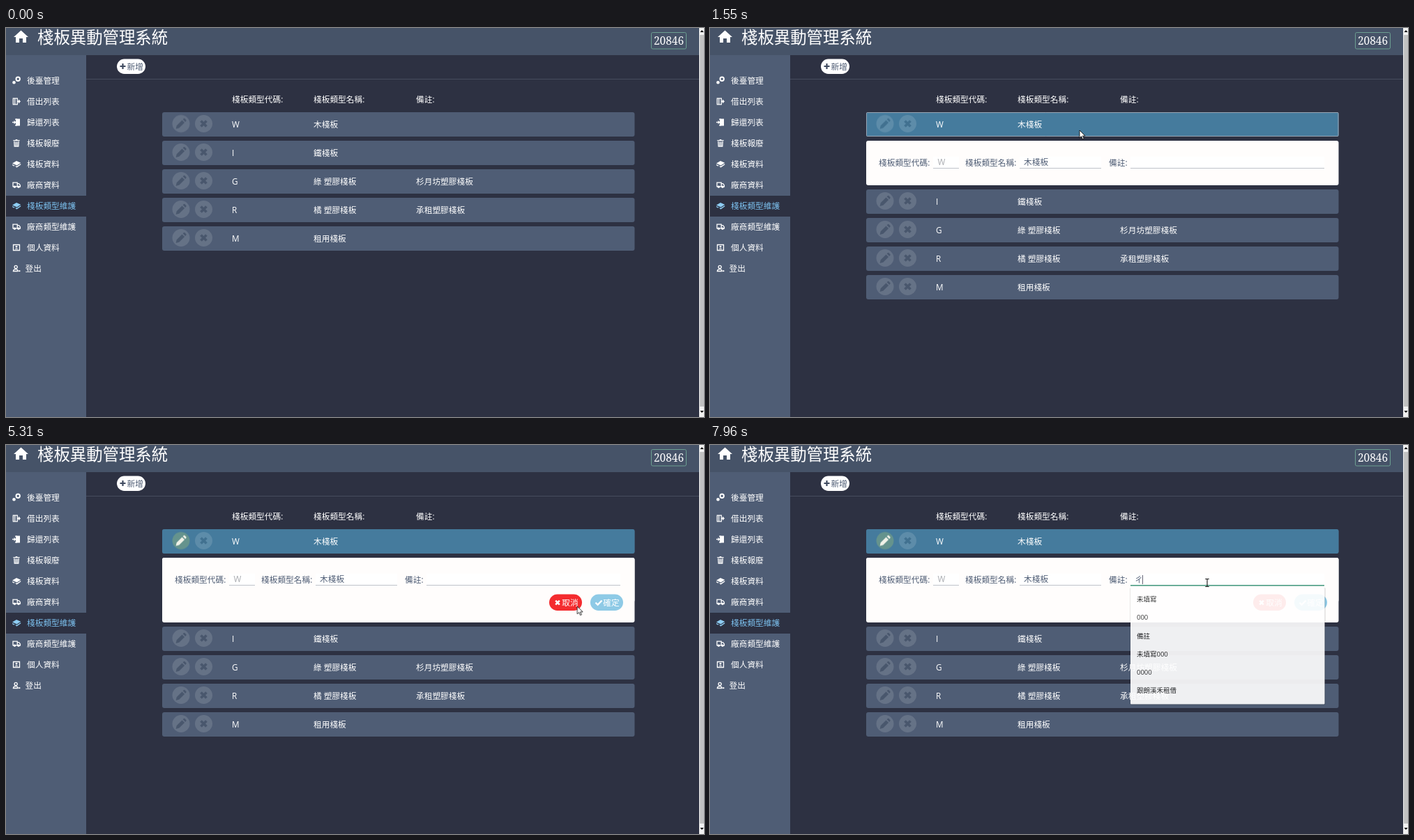
Recreate the animation shown at these times as an HTML page. Size 1001 by 559 pixels, loop 8000 ms.

```html
<!DOCTYPE html>
<html lang="zh-Hant">
<head>
<meta charset="utf-8">
<title>棧板異動管理系統</title>
<style>
html, body { margin: 0; width: 100%; height: 100%; overflow: hidden; background: #2d3142; }
svg { display: block; width: 1001px; height: 559px; }
text { font: 11.7px "Open Sans", "Noto Sans CJK TC", "Noto Sans CJK JP", sans-serif; fill: #fff; white-space: pre; }
.title { font-size: 23.4px; font-weight: 500; }
.badge { font: 15.4px "Noto Serif", serif; }
.slate { fill: #4f5d75; }
.dim { fill: #a9abb0; }
.menu text { font-size: 9.5px; fill: #222; }
.active text { fill: #7cc0ee; }
.active .icon { color: #8ecdf3; }
.icon { color: #fff; fill: currentColor; stroke: none; }
.line { fill: none; stroke: currentColor; stroke-width: 1.3; }
.btn { opacity: .13; }
.hover { fill: none; stroke: #98a5b4; opacity: 0; }

/* Every animation shares the 8 s loop */
.sel, .panel, .lower, .tall, .pass, .wHover, .drop, .focus, .caret, .typed, .arrow, .beam {
  animation: 8s step-end infinite; }
.sel, .panel { animation-name: open; }
.lower { animation-name: lower; }
.tall { animation-name: tall; }
.pass { animation-name: pass; }
.wHover { animation-name: wHover; }
.drop { animation-name: drop; }
.focus { animation-name: focus; }
.caret { animation-name: caret; }
.typed { animation-name: typed; }
.arrow { animation-name: arrow; }
.beam { animation-name: beam; }
.pen { animation: pen 8s linear infinite; }
.edit { animation: edit 8s linear infinite; }
.cursor { animation: cursor 8s linear infinite; }
.click { animation: click 8s step-end infinite; }

@keyframes open { 0% { opacity: 0 } 19.375%, 100% { opacity: 1 } }
@keyframes tall { 0% { opacity: 0 } 40.75%, 100% { opacity: 1 } }
@keyframes lower {
  0% { transform: translateY(0) }
  19.375% { transform: translateY(70px) }
  40.75%, 100% { transform: translateY(99px) }
}
@keyframes pass { 0% { opacity: 1 } .875%, 100% { opacity: 0 } }
@keyframes wHover { 0% { opacity: 0 } 13.5% { opacity: 1 } 44.4%, 100% { opacity: 0 } }
@keyframes pen { 0%, 33% { opacity: .13 } 35.6%, 42.4% { opacity: 1 } 44.6%, 100% { opacity: 0 } }
@keyframes edit { 0%, 42.4% { opacity: 0 } 44.6%, 100% { opacity: 1 } }
@keyframes drop { 0% { opacity: 0 } 73.125% { opacity: 1 } 99.5%, 100% { opacity: .91 } }
@keyframes focus { 0% { opacity: 0 } 73.125%, 100% { opacity: 1 } }
@keyframes caret {
  0% { opacity: 0 } 73.125% { opacity: 1 } 79.625% { opacity: 0 }
  86.25% { opacity: 1 } 92%, 100% { opacity: 0 }
}
@keyframes typed { 0% { opacity: 0 } 98.625%, 100% { opacity: 1 } }
@keyframes click {
  0% { opacity: 0 } 17.75% { opacity: .57 } 19.375% { opacity: 0 }
  39.125% { opacity: .57 } 40.75% { opacity: 0 }
  73.125% { opacity: .8 } 73.875%, 100% { opacity: 0 }
}
@keyframes arrow {
  0% { opacity: 0 } 6.625% { opacity: 1 } 47.5% { opacity: 0 }
  54.5% { opacity: 1 } 67.5%, 100% { opacity: 0 }
}
@keyframes beam {
  0% { opacity: 0 } 47.5% { opacity: 1 } 54.5% { opacity: 0 } 67.5%, 100% { opacity: 1 }
}
@keyframes cursor {
  0%, 6.625% { transform: translate(990px, 548px) }
  8.375% { transform: translate(850px, 430px) }
  10.125% { transform: translate(690px, 318px) }
  11% { transform: translate(636px, 274px) }
  12.75% { transform: translate(557px, 188px) }
  13.625%, 24.375% { transform: translate(530px, 147px) }
  26% { transform: translate(505px, 146px) }
  29% { transform: translate(345px, 146px) }
  31% { transform: translate(290px, 150px) }
  33% { transform: translate(235px, 146px) }
  33.875% { transform: translate(247px, 140px) }
  34.75%, 41.6% { transform: translate(249px, 139px) }
  44.4% { transform: translate(345px, 157px) }
  47% { transform: translate(470px, 184px) }
  48.625% { transform: translate(506px, 197px) }
  50.25%, 53.625% { transform: translate(506px, 198px) }
  55.4% { transform: translate(600px, 209px) }
  57.2% { transform: translate(740px, 233px) }
  58.8% { transform: translate(825px, 244px) }
  59.75%, 66.375% { transform: translate(820px, 232px) }
  68.125%, 100% { transform: translate(713px, 198px) }
}
</style>
</head>
<body>
<svg id="stage" viewBox="0 0 1001 559"></svg>
<script>
const text = (x, y, s, cls = '') => `<text x="${x}" y="${y + 4.3}" class="${cls}">${s}</text>`;
const rect = (x, y, w, h, fill, rx = 0, more = '') =>
  `<rect x="${x}" y="${y}" width="${w}" height="${h}" rx="${rx}" fill="${fill}" ${more}/>`;
const at = (x, y, body, cls = '') => `<g transform="translate(${x} ${y})"><g class="${cls}">${body}</g></g>`;
const path = (d, cls = '') => `<path d="${d}" class="${cls}"/>`;

// Icons, drawn around their own centre
const pallet = path('M-6 -1L0 -4.5L6.2 -1.8L.6 2Z M-6 .5L.4 3.2L6.2 -.6V1L.6 5L-1 4.2V3L-3 2V3.2L-6 1.8Z');
const truck = path('M-5 -3.3H1.2V2.4H-5Z M1.2 -1.8H3.6L5.4 .4V2.6H1.2', 'line')
  + '<circle cx="-2.6" cy="2.8" r="1.7"/><circle cx="3" cy="2.8" r="1.7"/>';
const gear = (x, y, r) => `<circle cx="${x}" cy="${y}" r="${r}" fill="none" stroke="currentColor" stroke-width="2"/>`;
const icons = {
  gears: gear(2.2, -2.2, 2.7) + gear(-3.5, 2.7, 1.3),
  lend: path('M-4.7 -4.3H1.3V4.3H-4.7Z M-2.3 -4.3V4.3', 'line') + path('M1 -1H3V-3L6 0L3 3V1H1Z'),
  back: path('M-1 -5H5V5H-1Z') + path('M-6 -.8H-3.4V-2.8L-.4 0L-3.4 2.8V.8H-6Z') + path('M-2 -4.3H1 M-2 4.3H1', 'line'),
  trash: path('M-4.6 -4.6H-1.6L-1 -5.5H1L1.6 -4.6H4.6V-3.2H-4.6Z') + path('M-3.2 -2.6L-2.8 4.6H2.8L3.2 -2.6M-1 -2V4M1 -2V4', 'line'),
  pallet, truck,
  card: path('M-4.5 -4H4.5V4H-4.5Z', 'line') + '<circle cy="-1.2" r="1.4"/>' + path('M-2.4 2.6Q0 -.6 2.4 2.6Z'),
  user: '<circle cx="-.8" cy="-2" r="2.1" class="line"/>' + path('M-4.6 4Q-4.4 1.2 -.8 1.2Q1 1.2 1.6 2.4V4Z', 'line') + path('M2.6 2.8H5.4V4.6H2.6Z'),
};
const pencil = path('M-7.4 7.4L-6.3 2.7L1.5 -5.1L5.1 -1.5L-2.7 6.3Z M2.6 -6.2L4 -7.5Q4.8 -8 5.6 -7.3L7.3 -5.6Q8 -4.8 7.5 -4L6.2 -2.6Z');
const cross = (r, w) => `<path d="M${-r} ${-r}L${r} ${r}M${r} ${-r}L${-r} ${r}" fill="none" stroke="currentColor" stroke-width="${w}"/>`;
const disc = (fill, glyph, color) => `<circle r="12.5" fill="${fill}"/><g class="icon" style="color:${color}">${glyph}</g>`;

const nav = [
  ['gears', '後臺管理'], ['lend', '借出列表'], ['back', '歸還列表'], ['trash', '棧板報廢'], ['pallet', '棧板資料'],
  ['truck', '廠商資料'], ['pallet', '棧板類型維護'], ['truck', '廠商類型維護'], ['card', '個人資料'], ['user', '登出'],
].map(([icon, label], i) => {
  const y = 76 + 30 * i;
  return `<g class="${i === 6 ? 'active' : ''}">${at(15, y - .5, icons[icon], 'icon')}${text(i === 9 ? 27.5 : 30, y, label)}</g>`;
}).join('');

const rows = [
  ['W', '木棧板', ''], ['I', '鐵棧板', ''], ['G', '綠 塑膠棧板', '杉月坊塑膠棧板'],
  ['R', '橘 塑膠棧板', '承租塑膠棧板'], ['M', '租用棧板', ''],
].map(([code, name, note], i) => {
  const y = 121 + 41 * i, mid = y + 17;
  const delay = 810 + 70 * (4 - i) - 8000;
  return rect(224, y, 677.5, 35, '#4f5d75', 3)
    + (i ? '' : rect(224, y, 677.5, 35, '#457b9d', 3, 'class="sel"'))
    + rect(224.5, y + .5, 676.5, 34, 'none', 1, `class="hover ${i ? 'pass' : 'wHover'}" style="animation-delay:${i ? delay : 0}ms"`)
    + at(251, mid - .5, disc('#fff', pencil, '#2d3142'), i ? 'btn' : 'pen')
    + (i ? '' : at(251, mid - .5, disc('#65938d', pencil, '#f1f2e8'), 'edit'))
    + at(283.5, mid - .5, disc('#fff', cross(4, 3.8), '#2d3142'), 'btn')
    + text(324, y + 18, code) + text(441, y + 18, name) + text(588, y + 18, note);
});

const field = (x, w) => rect(x, 185, w, 17, '#fff') + rect(x, 201, w, 1, '#bfc3ca');
const pill = (x, fill, glyph, label) => rect(x, 214.5, 47, 23.5, fill, 11.75)
  + at(x + 12, 226.5, glyph, 'icon') + text(x + 18.3, 226.5, label);

const panel = `<g class="panel">${rect(224, 162, 677.5, 64, '#fffdfc', 3)}
  <g class="tall">${rect(224, 162, 677.5, 93, '#fffdfc', 3)}
    ${pill(779, '#f42c2f', cross(2.8, 2.6), '取消')}
    ${pill(838, '#8ecae6', '<path d="M-4.5 0L-1.4 3L4.5 -3" fill="none" stroke="currentColor" stroke-width="2.4"/>', '確定')}</g>
  ${field(320, 37)}${field(444, 117)}${field(603, 278)}
  ${text(242, 194, '棧板類型代碼:', 'slate')}${text(366, 194, '棧板類型名稱:', 'slate')}${text(572, 194, '備註:', 'slate')}
  ${text(326.5, 193, 'W', 'dim')}${text(450, 193, '木棧板', 'slate')}</g>`;

const menu = `<g class="drop menu">
  ${rect(602.5, 204.5, 280, 169, '#0003', 2)}${rect(603, 204, 278.5, 168.5, '#fff', 1)}
  ${['未填寫', '000', '備註', '未填寫000', '0000', '跟朗溪禾租借'].map((s, i) => text(612, 220.6 + 26.3 * i, s)).join('')}</g>
  <g class="focus">${rect(603, 201, 278, 1.6, '#4a9c82')}</g>
  <g class="caret">${rect(609, 187, 1, 13, '#667')}</g>
  <g class="typed">${text(609, 193.5, 'ㄔ', 'slate')}${rect(620, 187, 1, 13, '#667')}</g>`;

const cursor = `<g class="cursor">
  <circle cx="-.7" cy="0" r="9" fill="#ffe000" class="click"/>
  <path class="arrow" d="M0 0V11L2.6 8.7L4.4 12.8L6.2 12L4.4 8H8Z" fill="#fff" stroke="#000" stroke-width=".8"/>
  <path class="beam" d="M-2.7 -5.5H-.8L0 -5L.8 -5.5H2.7M-2.7 5.5H-.8L0 5L.8 5.5H2.7M0 -5V5" fill="none" stroke="#111" stroke-width="1.1"/></g>`;

document.getElementById('stage').innerHTML =
  rect(0, 0, 1001, 559, '#2d3142')
  + rect(0, 39, 115, 520, '#4f5d75') + rect(0, 241, 115, 30, '#2d3142')
  + rect(0, 0, 994, 39, '#465368')
  + path('M21.5 3.5L32 13H29V21H24V15H19V21H14V13H11Z', 'icon')
  + `<text x="45" y="22.4" class="title">棧板異動管理系統</text>`
  + rect(925.5, 6.5, 50, 23.5, 'none', 2, 'stroke="#6c9f91"')
  + `<text x="929" y="24" class="badge">20846</text>`
  + nav
  + rect(115, 73, 879, 1, '#474c5e')
  + rect(159, 44.5, 41, 21.5, '#fff', 10.75)
  + at(167.5, 55, path('M-4 0H4M0 -4V4', 'line'), 'slate').replace('class="line"', 'style="stroke:#3f4a60;stroke-width:2.2"')
  + text(173.5, 55.5, '新增', 'slate')
  + text(324, 103, '棧板類型代碼:') + text(441, 103, '棧板類型名稱:') + text(588, 103, '備註:')
  + rows[0] + `<g class="lower">${rows.slice(1).join('')}</g>`
  + panel + menu
  + rect(994, 0, 7, 559, '#f1f1f1') + rect(995, 10, 6, 534, '#c1c1c1')
  + path('M995.5 6L998 3L1000.5 6Z') + path('M995.5 550L998 553L1000.5 550Z')
  + cursor;
</script>
</body>
</html>
```
